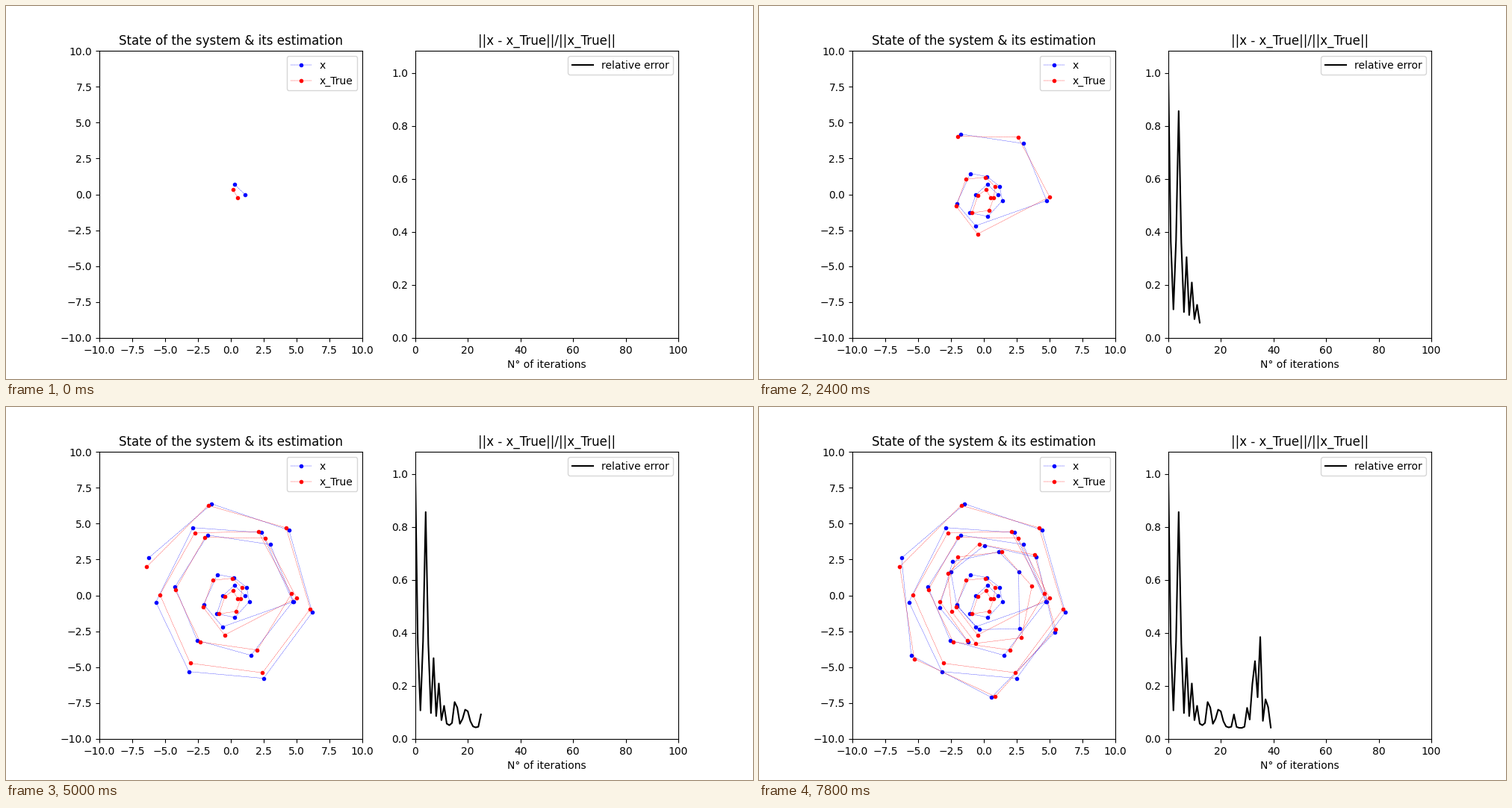
Animation, 1000 px wide and 500 px high, one loop 8000 ms. Source, as a matplotlib script:

```python
import numpy as np
import matplotlib.pyplot as plt
from matplotlib.animation import FuncAnimation

STEPS = 40
INTERVAL = 200
TURN = 60  # degrees the state rotates per iteration

# Key points of the orbit: iteration, radius, phase in degrees.
ORBIT = [(0, .57, -24), (1, .37, 4), (2, .47, 70), (3, 1.57, 55),
         (5, .79, 43), (7, 1.2, 24), (10, 2.8, 20), (11, 5, 58),
         (15, 4, 54), (18, 4.9, 65), (22, 5.9, 54), (28, 7.1, 37),
         (31, 3.6, 36), (33, 2.7, 25), (35, 4.1, 14), (37, 3.3, 6),
         (40, 3.4, 8)]

# Direction of the estimate's offset, in degrees from the radius.
OFFSET = [(0, 47), (3, -60), (5, 0), (10, -155), (13, -80), (18, -80),
          (20, 60), (24, -85), (30, -85), (36, -235), (40, -300)]

# Bumps of the relative error: centre, height, width.
BUMPS = [(0, .93, .9), (4, .78, 1), (7, .24, .6), (9, .15, .6),
         (11, .07, .6), (15.4, .11, .9), (19.4, .07, 1.5), (25, .05, .6),
         (30, .075, .6), (32.8, .26, 1.2), (35, .335, .6), (37.4, .14, .8)]


def between(keys, k):
    """Interpolate every value column of the key points at k."""
    at, *columns = np.transpose(keys)
    return [np.interp(k, at, column) for column in columns]


def polar(radius, degrees):
    return radius * np.exp(1j * np.radians(degrees))


def relative_error(k):
    floor = 0.04 + 0.06 * np.exp(-k / 8)
    return floor + sum(h * np.exp(-((k - c) / w) ** 2) for c, h, w in BUMPS)


k = np.arange(STEPS + 1)
error = relative_error(k[:-1])

radius, phase = between(ORBIT, k)
truth = polar(radius, TURN * k + phase)

# The starting guess shares the first error value.
direction, = between(OFFSET, k)
estimate = truth * (1 + polar(relative_error(np.maximum(k - 1, 0)), direction))

fig, (ax_state, ax_error) = plt.subplots(1, 2, figsize=(10, 5), dpi=100)

ax_state.set_title("State of the system & its estimation")
ax_state.set_xlim(-10, 10)
ax_state.set_ylim(-10, 10)
est_line, = ax_state.plot([], [], "b.--", lw=0.3, label="x")
true_line, = ax_state.plot([], [], "r.--", lw=0.3, label="x_True")
ax_state.legend(loc="upper right")

ax_error.set_title("||x - x_True||/||x_True||")
ax_error.set_xlabel("N° of iterations")
ax_error.set_xlim(0, 100)
ax_error.set_ylim(0, 1.0837)
err_line, = ax_error.plot([], [], "k", label="relative error")
ax_error.legend(loc="upper right")


def update(step):
    for line, path in ((est_line, estimate), (true_line, truth)):
        shown = path[:step + 2]
        line.set_data(shown.real, shown.imag)
    err_line.set_data(k[:step + 1], error[:step + 1])
    return est_line, true_line, err_line


anim = FuncAnimation(fig, update, frames=STEPS, interval=INTERVAL,
                     init_func=lambda: update(0), repeat=True, repeat_delay=0)
plt.show()
```
